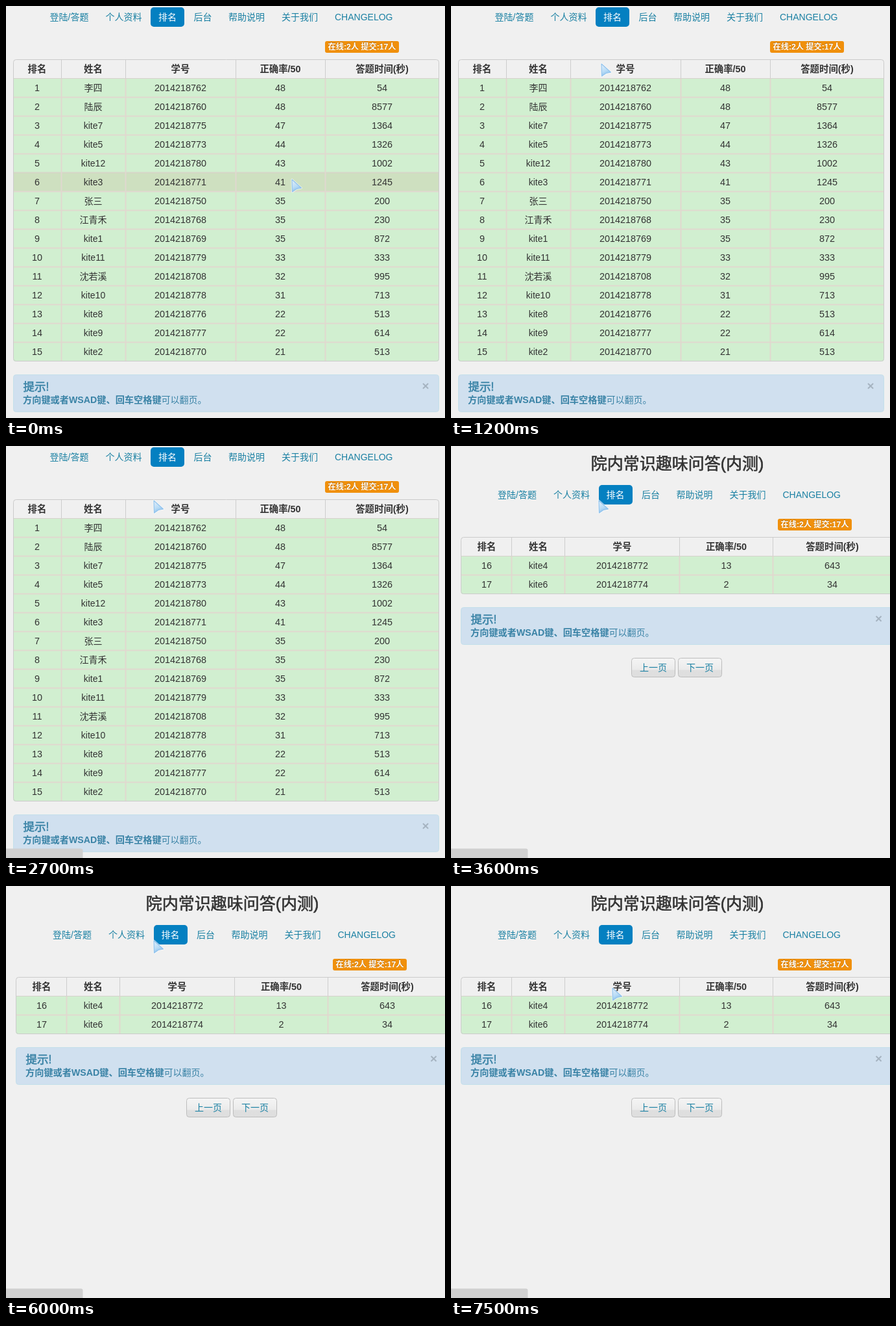
An HTML page with a canvas for the animation above (8 s loop, 677 px wide and 634 px high).

```html
<!DOCTYPE html>
<html lang="zh-CN">
<head>
<meta charset="utf-8">
<title>排名</title>
<style>
html, body { margin: 0; width: 100%; height: 100%; overflow: hidden; background: #f0f0f0; }
canvas { display: block; width: 677px; height: 634px; }
</style>
</head>
<body>
<canvas id="stage" width="677" height="634"></canvas>
<script>
const ctx = document.getElementById('stage').getContext('2d');
const FAMILY = '"Liberation Sans", "Noto Sans CJK SC", "Noto Sans CJK", sans-serif';
const LOOP = 8000;
const ROW = 29;
const LINK = '#1a80a3', INK = '#333', INFO = '#3a83a6';

const HEADS = ['排名', '姓名', '学号', '正确率/50', '答题时间(秒)'];
// name, last three digits of the number, score, seconds
const RESULTS = [
  ['李四', 762, 48, 54], ['陆辰', 760, 48, 8577], ['kite7', 775, 47, 1364],
  ['kite5', 773, 44, 1326], ['kite12', 780, 43, 1002], ['kite3', 771, 41, 1245],
  ['张三', 750, 35, 200], ['江青禾', 768, 35, 230], ['kite1', 769, 35, 872],
  ['kite11', 779, 33, 333], ['沈若溪', 708, 32, 995], ['kite10', 778, 31, 713],
  ['kite8', 776, 22, 513], ['kite9', 777, 22, 614], ['kite2', 770, 21, 513],
  ['kite4', 772, 13, 643], ['kite6', 774, 2, 34]
].map(([name, id, score, secs], i) => [i + 1, name, '2014218' + id, score, secs]);

const NAV = [['登陆/答题', 67.5], ['个人资料', 153.5], ['排名', 235], ['后台', 289.5],
  ['帮助说明', 343], ['关于我们', 425], ['CHANGELOG', 507]];

const PAGES = [
  { dx: 0, navY: 17, badgeX: 492, tableY: 82, edges: [11, 85, 184, 354, 492, 667],
    mids: [48, 134.5, 269, 423, 580], rows: RESULTS.slice(0, 15), alertY: 567, closeX: 647 },
  { dx: 4.5, navY: 75, badgeX: 504, tableY: 140, edges: [15, 93, 175, 352, 496, 680],
    mids: [55, 134.5, 264, 424.5, 588], rows: RESULTS.slice(15), alertY: 248, closeX: 659.5 }
];

// time, x, y of the pointer tip; it jumps between these
const POINTER = [[0, 440, 266], [300, 392, 226], [600, 358, 197], [900, 301, 149],
  [1200, 231, 88], [2400, 227, 83], [6300, 247, 138], [7500, 248, 156]];

// "heavy" thickens regular glyphs, for a weight between regular and bold
function text(str, x, mid, { size = 14, color = INK, bold = false, heavy = 0, align = 'left' } = {}) {
  const y = Math.round(mid + size * 0.36);
  ctx.font = `${bold ? 'bold ' : ''}${size}px ${FAMILY}`;
  ctx.textAlign = align;
  ctx.fillStyle = ctx.strokeStyle = color;
  ctx.fillText(str, x, y);
  if (heavy) {
    ctx.lineWidth = heavy;
    ctx.strokeText(str, x, y);
  }
}

function rect(x, y, w, h, color) {
  ctx.fillStyle = color;
  ctx.fillRect(x, y, w, h);
}

function box(x, y, w, h, r, fill, stroke) {
  ctx.beginPath();
  if (stroke) ctx.roundRect(x + 0.5, y + 0.5, w - 1, h - 1, r);
  else ctx.roundRect(x, y, w, h, r);
  if (fill) { ctx.fillStyle = fill; ctx.fill(); }
  if (stroke) { ctx.strokeStyle = stroke; ctx.lineWidth = 1; ctx.stroke(); }
}

function drawNav({ dx, navY }) {
  box(Math.round(223 + dx), navY - 15, 52, 30, 5, '#0480c1');
  for (const [label, x] of NAV)
    text(label, x + dx, navY, { color: label === '排名' ? '#fff' : LINK });
}

function drawBadge({ badgeX, tableY }) {
  box(badgeX, tableY - 28, 114, 18, 3, '#f0900c');
  const label = '在线:2人 提交:17人';
  const style = { size: 12.2, bold: true, align: 'center' };
  text(label, badgeX + 57, tableY - 20, { ...style, color: 'rgba(0,0,0,.25)' });
  text(label, badgeX + 57, tableY - 19, { ...style, color: '#fff' });
}

// Soft cell border around a one pixel line
function rowLine(x, y, w, on) {
  rect(x, y - 1, w, 3, on ? 'rgba(216,214,200,.5)' : 'rgba(226,217,208,.5)');
  rect(x, y, w, 1, on ? '#d6d6c8' : '#e0d8d0');
}

function columnLine(x, y, h) {
  rect(x - 1, y, 3, h, 'rgba(226,217,208,.5)');
  rect(x, y, 1, h, '#e0d8d0');
}

function drawTable({ edges, mids, rows, tableY }, hover) {
  const left = edges[0], width = edges[5] + 1 - left;
  const bodyY = tableY + ROW + 1, height = ROW * (rows.length + 1) + 1;
  ctx.save();
  ctx.beginPath();
  ctx.roundRect(left, tableY, width, height, 4);
  ctx.clip();
  rows.forEach((row, i) => {
    const y = bodyY + i * ROW;
    rect(left, y, width, ROW, i === hover ? '#cee0c0' : '#d1efd0');
    if (i) rowLine(left, y - 1, width, i === hover);
  });
  for (const x of edges.slice(1, 5)) {
    rect(x, tableY, 1, ROW, '#cdcdcd');
    columnLine(x, bodyY, height);
  }
  rect(left, bodyY - 1, width, 1, '#d6d2cc');
  ctx.restore();
  box(left, tableY, width, height, 4, null, '#cbcbcb');

  HEADS.forEach((head, c) =>
    text(head, mids[c], tableY + 15, { size: 14.4, bold: true, align: 'center' }));
  rows.forEach((row, i) => row.forEach((cell, c) =>
    text(cell, mids[c], tableY + 44 + i * ROW, { size: c === 1 ? 14 : 14.4, align: 'center' })));
}

function drawAlert({ edges, alertY, closeX }) {
  const x = edges[0];
  box(x, alertY, edges[5] + 1 - x, 58, 4, '#d0e0ef', '#c3dfea');
  text('提示!', x + 15.5, alertY + 19, { size: 17.5, heavy: 0.6, color: INFO });
  const keys = '方向键或者WSAD键、回车空格键';
  text(keys, x + 15, alertY + 39, { size: 14.2, bold: true, color: INFO });
  const end = x + 15 + ctx.measureText(keys).width;
  text('可以翻页。', end, alertY + 39, { color: INFO });
  text('×', closeX, alertY + 17, { size: 19, bold: true, color: '#a5b3c0', align: 'center' });
}

function drawButton(label, x) {
  const shade = ctx.createLinearGradient(0, 326, 0, 356);
  shade.addColorStop(0, '#f5f5f5');
  shade.addColorStop(0.6, '#ebebeb');
  shade.addColorStop(0.64, '#dfdfdf');
  shade.addColorStop(1, '#dedede');
  box(x, 326, 68, 30, 4, shade, '#bdbdbd');
  text(label, x + 34, 341, { color: LINK, align: 'center' });
}

function drawPointer(x, y) {
  ctx.save();
  ctx.translate(x, y);
  ctx.beginPath();
  ctx.moveTo(1, 1);
  ctx.lineTo(15.5, 14);
  ctx.lineTo(8, 15.5);
  ctx.lineTo(1.5, 20);
  ctx.closePath();
  ctx.lineJoin = 'round';
  ctx.strokeStyle = 'rgba(255,255,255,.6)';
  ctx.lineWidth = 3;
  ctx.stroke();
  const shade = ctx.createLinearGradient(2, 4, 9, 19);
  shade.addColorStop(0, '#d9eaf9');
  shade.addColorStop(0.55, '#b9dcf6');
  shade.addColorStop(1, '#86bdec');
  ctx.fillStyle = shade;
  ctx.fill();
  ctx.strokeStyle = '#92c3ec';
  ctx.lineWidth = 1.2;
  ctx.stroke();
  ctx.restore();
}

function draw(t) {
  const second = t >= 3600;
  const page = PAGES[+second];
  const [, px, py] = POINTER.findLast(step => step[0] <= t);
  const hover = second ? -1 : Math.floor((py - page.tableY - ROW - 1) / ROW);

  rect(0, 0, 677, 634, '#f0f0f0');
  if (second) {
    text('院内常识趣味问答(内测)', 349, 27, { size: 25, heavy: 0.6, align: 'center' });
    drawButton('上一页', 278);
    drawButton('下一页', 350);
  }
  drawNav(page);
  drawBadge(page);
  drawTable(page, hover);
  drawAlert(page);
  if (t >= 2700 && !(t >= 5700 && t < 6000)) box(-4, 619.5, 122.5, 20, 3, '#d0d0d0');
  drawPointer(px, py);
}

const start = performance.now();
function tick() {
  draw((performance.now() - start) % LOOP);
  requestAnimationFrame(tick);
}
tick();
</script>
</body>
</html>
```
